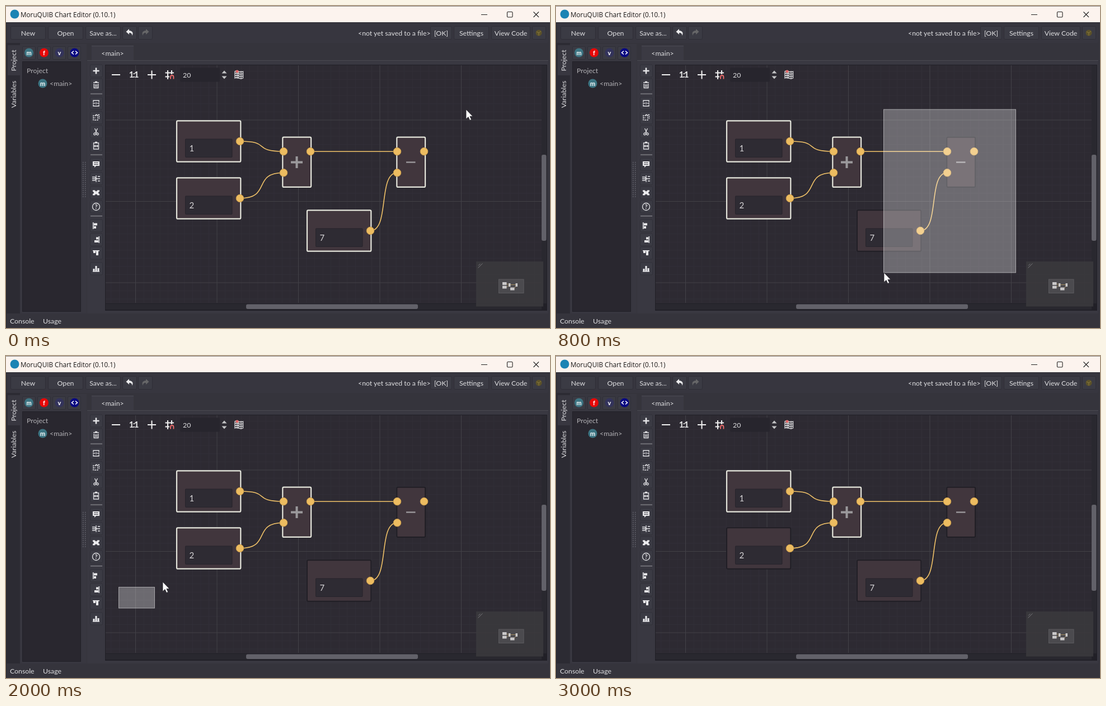
Animation of 972x576 px, one loop 3200 ms. Source, as an HTML page:

```html
<!DOCTYPE html>
<html lang="en">
<head>
<meta charset="utf-8">
<title>Node editor</title>
<style>
html, body { margin: 0; width: 100%; height: 100%; overflow: hidden; background: #35343c; }
svg { display: block; width: 972px; height: 576px; }
text { font-family: Lato, sans-serif; font-size: 12.3px; fill: #dfdfe1; white-space: pre; }
.title { font-family: "Open Sans", sans-serif; font-size: 11.7px; fill: #1c1a1a; }
.mid { text-anchor: middle; }
.dim { fill: #b4b3b7; }
.num { font-size: 15px; fill: #d6d4d6; }
.ico { fill: none; stroke: #e4e4e6; stroke-width: 1.3; }
.solid { fill: #ececee; }
.wire { fill: none; stroke: #efc168; stroke-width: 1.6; }
.wire.hot { stroke: #f6ecd6; stroke-width: 3; }
.box { fill: #41363d; stroke: #201e25; stroke-width: 2; }
.box.on { stroke: #e5e6dc; stroke-width: 2.2; }
</style>
</head>
<body>
<svg id="stage" viewBox="0 0 972 576" xmlns="http://www.w3.org/2000/svg"></svg>
<script>
const stage = document.getElementById('stage');

const rect = (x, y, w, h, fill, more = '') =>
  `<rect x="${x}" y="${y}" width="${w}" height="${h}" fill="${fill}" ${more}/>`;
const label = (x, y, s, cls = '', more = '') =>
  `<text x="${x}" y="${y}" class="${cls}" ${more}>${s.replace(/</g, '&lt;')}</text>`;
const path = (d, cls = 'ico', more = '') => `<path d="${d}" class="${cls}" ${more}/>`;
const disc = (x, y, r, fill, more = '') => `<circle cx="${x}" cy="${y}" r="${r}" fill="${fill}" ${more}/>`;
const at = (x, y, s) => `<g transform="translate(${x} ${y})">${s}</g>`;
const button = (x, w, s = '') =>
  rect(x + .5, 36.5, w - 1, 23, '#3b3b44', 'rx="2" stroke="#2f2e36"') +
  (s && label(x + w / 2, 52.5, s, 'mid'));
const badge = (x, y, fill, s) => disc(x, y, 8, fill) +
  label(x, y + 4, s, 'mid', 'style="font-size:11px;font-weight:700;fill:#fff"');

function titleBar() {
  return rect(0, 0, 972, 29, '#fcf3ee') + rect(0, 0, 972, 1, '#8d8885') +
    disc(15.5, 14.5, 8, '#1b84b4') +
    label(26, 19.5, 'MoruQUIB Chart Editor (0.10.1)', 'title') +
    path('M849 15.5H860M942.5 10.5L952 20M952 10.5L942.5 20', '', 'fill="none" stroke="#222" stroke-width="1.1"') +
    rect(895.5, 10.5, 9.5, 9.5, 'none', 'rx="1.5" stroke="#222" stroke-width="1.1"');
}

function topBar() {
  return rect(3, 31, 966, 35, '#37363f', 'rx="2"') +
    button(8, 63, 'New') + button(75, 63, 'Open') + button(142, 63, 'Save as...') +
    button(208, 26) + button(236, 26) +
    path('M220 41L214.5 46L220 51V48Q225 47.5 225.5 53Q229 45 220 44Z', 'solid') +
    path('M250 41L255.5 46L250 51V48Q245 47.5 244.5 53Q241 45 250 44Z', '', 'fill="#666668"') +
    button(758, 39, '[OK]') + button(800, 63, 'Settings') + button(867, 70, 'View Code') + button(940, 25) +
    label(629, 52.5, '<not yet saved to a file>') +
    disc(952, 48, 5.5, '#5c5229') + path('M948 46L952 48L956 45M952 48V53', '', 'stroke="#8b7b3c" fill="none"');
}

function sidePanel() {
  let dots = '';
  for (let y = 279; y < 342; y += 3.6) dots += rect(137, y, 1.5, 1.5, '#67676f') + rect(141, y, 1.5, 1.5, '#67676f');
  const tab = (y, s) => label(0, 0, s, 'mid', `transform="translate(17.5 ${y}) rotate(-90)"`);
  return rect(0, 66, 25, 484, '#2c2b33') + rect(25, 68, 119, 482, '#383740') +
    rect(3, 70, 22, 54, '#383740') + tab(97.5, 'Project') + tab(158, 'Variables') +
    [31, 58, 85, 112].map(x => rect(x - 1.5, 72.5, 23, 23, '#3b3b44', 'rx="2" stroke="#2f2f37"')).join('') +
    badge(41, 83.5, '#3d7583', 'm') + badge(68, 83.5, '#e60808', 'f') +
    badge(95.5, 83.5, '#33335c', 'v') + disc(122.5, 83.5, 8, '#070782') +
    path('M121 80.5L117.5 83.5L121 86.5M124 80.5L127.5 83.5L124 86.5', 'ico', 'style="stroke:#fff;stroke-width:1.6"') +
    rect(29.5, 99.5, 104, 447, '#29272f', 'stroke="#222128"') +
    label(37, 119.5, 'Project', 'dim') + badge(65.5, 138.5, '#3d7583', 'm') + label(78, 143, '<main>', 'dim') + dots;
}

function toolStrip() {
  const rows = [
    [116, path('M-5.5 0H5.5M0-5.5V5.5', 'ico', 'style="stroke-width:2.6"')],
    [141, path('M-5-4H5M-2-5.5H2M-3.8-2V5.5H3.8V-2M-1.3-1V4M1.3-1V4')],
    [174, path('M-5-2V-5H5V-2M-5 2V5H5V2M-6 0H-2M2 0H6M0-2V2')],
    [200, path('M-5-2V-4H3V4H-5V2M-1-5.5H5.5V2M-6 0H-1', 'ico', 'stroke-dasharray="3 1.2"')],
    [225, path('M-2.5-6L1.5 2M2.5-6L-1.5 2') + disc(-2.5, 4, 1.8, 'none', 'class="ico"') + disc(2.5, 4, 1.8, 'none', 'class="ico"')],
    [250, path('M-4.5-5H4.5V6H-4.5ZM-2-6.5H2M-3 .5H3M-1.5-1.5L-3 .5L-1.5 2.5M1.5-1.5L3 .5L1.5 2.5')],
    [283, path('M-6-5H6V3H0L-3 6V3H-6Z', 'solid') + path('M-4-2.5H4M-4 .5H4', '', 'stroke="#3b3b44"')],
    [309, path('M-7-3H-2L1 0M-7 0H7M-7 3H-2L1 0M3-4H7M3 4H7M0-6V6')],
    [334, path('M-6-4.5H-2A2 2 0 0 0 2-4.5H6V-2A2 2 0 0 0 6 2V4.5H2A2 2 0 0 0-2 4.5H-6V2A2 2 0 0 0-6-2Z', 'solid')],
    [359, disc(0, 0, 6.5, 'none', 'class="ico"') + label(0, 4, '?', 'mid', 'style="font-size:11px;font-weight:700"')],
    [393, path('M-6-6H-4.5V6H-6ZM-4-4.5H2V-.5H-4ZM-4 1H0V5H-4Z', 'solid')],
    [418, path('M4.5-6H6V6H4.5ZM0-4.5H4V-.5H0ZM-3 1H4V5H-3Z', 'solid')],
    [442, path('M-6-5H6V-3.5H-6ZM-5-3.5H-1V0H-5ZM0-3.5H4V4H0Z', 'solid')],
    [470, path('M-6 4H6V5.5H-6ZM-5.5 0H-2.5V4H-5.5ZM-1.5-5H1.5V4H-1.5ZM2.5-1H5.5V4H2.5Z', 'solid')]
  ];
  return rows.map(([y, icon]) => rect(150.5, y - 11, 22, 22, '#3b3b44', 'rx="2" stroke="#303038"') + at(161, y, icon)).join('') +
    [157, 266, 375.5].map(y => rect(151, y - .5, 21, 1.3, '#85858b')).join('');
}

function canvasArea() {
  let minor = '', major = '';
  const step = 14.55;
  for (let i = -3; i < 50; i++) {
    const d = `M${(231.5 + i * step).toFixed(1)} 106V531`;
    i % 10 ? minor += d : major += d;
  }
  for (let i = -6; i < 23; i++) {
    const d = `M178 ${(204 + i * step).toFixed(1)}H957`;
    i % 10 ? minor += d : major += d;
  }
  return rect(145, 97, 824, 453, '#393841') + rect(145, 97, 824, 1, '#4a4a52') +
    rect(153, 72, 75, 25, '#3b3a43') + rect(153, 71, 75, 1, '#4c4c55') + label(190.5, 89, '<main>', 'mid') +
    rect(177, 105, 790, 440, '#212027') + rect(178, 106, 779, 426, '#2d2a32') +
    path(minor, '', 'stroke="#322f38" fill="none"') + path(major, '', 'stroke="#434147" fill="none"') +
    rect(178, 533, 779, 10, '#29282f') + rect(429, 533.5, 307, 8.5, '#626169', 'rx="3"') +
    rect(957, 106, 9, 426, '#29282f') + rect(957, 266, 8.5, 154, '#626169', 'rx="3"');
}

function canvasTools() {
  const thick = 'style="stroke-width:2;stroke:#f0f0f0"';
  return path('M189 123H204M253 123H268M260.5 115.5V130.5', 'ico', thick) +
    label(227.8, 128, '1:1', 'mid', 'style="font-size:15px;font-weight:700;fill:#f0f0f0;letter-spacing:-1.8px"') +
    path('M289 115V131M296 115V122M284.5 119.5H300M284.5 126.5H292', 'ico', thick) +
    path('M294 130.5V127Q294 124 296.7 124T299.4 127V130.5', 'ico', 'style="stroke:#e66a6a;stroke-width:2"') +
    rect(311, 110.5, 71, 25, '#27252d', 'rx="2"') + label(316, 127.5, '20') +
    path('M385.5 120.5L390 115.5L394.5 120.5ZM385.5 125.5L390 130.5L394.5 125.5Z', 'solid', 'style="fill:#c4c4c6"') +
    path('M409 117Q412.5 115 416 117T423.5 117V129Q420 131 416 129T409 129ZM409 121Q412.5 119 416 121T423.5 121M409 125Q412.5 123 416 125T423.5 125M413 116V130M416 117V130M420 116V130') +
    disc(413, 117, 2.5, '#e66a6a');
}

function miniMap() {
  const g = '#c9c8c9';
  return rect(840, 457, 120, 80.5, '#3b393d', 'opacity=".88"') +
    path('M843.5 468.5L851.5 460.5M844 464.5L847.5 461', '', 'stroke="#77767a"') +
    rect(880.5, 489, 44.5, 24.5, '#4b4a4e', 'stroke="#5c5b5f"') +
    path('M894 497L898 498M894 503L898 500M901 498.5H911M908 505L911 501', '', 'stroke="#b89a60" fill="none" stroke-width=".8"') +
    rect(887, 494, 7.5, 5, g) + rect(887, 500.5, 7.5, 5, g) +
    rect(898, 496, 3.5, 6, g) + rect(910.5, 496, 3.5, 6, g) + rect(901, 503.5, 7.5, 5, g);
}

// dropAt: time at which the node loses its selection
const nodes = [
  { x: 305, y: 205.3, num: '1' },
  { x: 305, y: 307.3, num: '2', dropAt: 2200 },
  { x: 538, y: 365.3, num: '7', dropAt: 600 },
  { x: 494.3, y: 234.7, sign: 'M509 279.5H530M519.5 269V290', bold: 4 },
  { x: 698.3, y: 234.7, sign: 'M715 279.5H731.5', bold: 2.4, dropAt: 400 }
];

const node = n => n.num
  ? rect(n.x, n.y, 114.3, 73.4, '', 'rx="2" class="box"') +
    rect(n.x + 15.5, n.y + 32.7, 83.5, 32.5, '#2e2b33', 'stroke="#26232b" rx="1"') +
    label(n.x + 22.5, n.y + 54.7, n.num, 'num')
  : rect(n.x, n.y, 50.8, 89.2, '', 'rx="2" class="box"') +
    path(n.sign, '', `fill="none" stroke="#9b999c" stroke-width="${n.bold}"`);

const port = (x, y) => disc(x, y, 6.8, '#edbc60', 'stroke="#c69a4c" stroke-width="1"');
const BEND = .73;
const wire = (x1, y1, x2, y2) => {
  const pull = (x2 - x1) * BEND;
  return path(`M${x1} ${y1}C${x1 + pull} ${y1} ${x2 - pull} ${y2} ${x2} ${y2}`, 'wire');
};

stage.innerHTML =
  rect(0, 0, 972, 576, '#35343c') + titleBar() + topBar() + sidePanel() + canvasArea() + toolStrip() +
  nodes.map(node).join('') +
  wire(418, 242, 496, 260.2) + wire(418, 344, 496, 298.3) +
  wire(544, 260.2, 699, 260.2) + wire(651, 402, 699, 298.3) +
  [[418, 242], [418, 344], [651, 402], [496, 260.2], [496, 298.3], [544, 260.2],
   [699, 260.2], [699, 298.3], [747, 260.2]].map(p => port(...p)).join('') +
  rect(0, 0, 0, 0, '#fff', 'id="lasso" fill-opacity=".3" stroke="#fff" stroke-opacity=".5"') +
  canvasTools() + miniMap() +
  label(7, 568, 'Console') + label(66, 568, 'Usage') + rect(0, 30, 1, 546, '#25252b') +
  path('M0 0V17.2L4 13.5L6.8 19.5L9.6 18.2L6.9 12.4H12Z', '',
    'id="cursor" fill="#fff" stroke="#26242a" stroke-width=".8" stroke-linejoin="round"');

const boxes = stage.querySelectorAll('.box');
const hotWire = stage.querySelectorAll('.wire')[3];
const lasso = document.getElementById('lasso');
const cursor = document.getElementById('cursor');

// One pose per 200 ms: cursor x, y, then the free corner of the lasso
const TICK = 200, LOOP = 3200;
const poses = [
  [822, 185], [739, 275, 755, 267], [652, 405, 657.5, 398.5], [601, 475, 604, 473],
  [586, 477, 585.5, 477], [552, 482], [342, 380], [297, 360],
  [201, 437], [201, 450], [280, 404, 265.5, 413.5], [411, 331, 401, 338],
  [419, 325, 419, 325.5], [419, 325, 419, 325.5], [391, 446], null
];
const anchors = [[821.5, 185], [201.5, 451]];

function set(el, attrs) {
  for (const k in attrs) el.setAttribute(k, attrs[k]);
}

function draw(t) {
  const i = Math.floor(t / TICK), pose = poses[i];
  nodes.forEach((n, k) => boxes[k].classList.toggle('on', !(t >= n.dropAt)));
  hotWire.classList.toggle('hot', i === 2);
  cursor.style.display = pose ? '' : 'none';
  if (pose) set(cursor, { transform: `translate(${pose[0]} ${pose[1]})` });
  const open = pose && pose.length > 2;
  lasso.style.display = open ? '' : 'none';
  if (open) {
    const [ax, ay] = anchors[i < 8 ? 0 : 1], [, , x, y] = pose;
    set(lasso, { x: Math.min(ax, x), y: Math.min(ay, y), width: Math.abs(ax - x), height: Math.abs(ay - y) });
  }
}

const start = performance.now();
function loop() {
  draw((performance.now() - start) % LOOP);
  requestAnimationFrame(loop);
}
loop();
</script>
</body>
</html>
```
